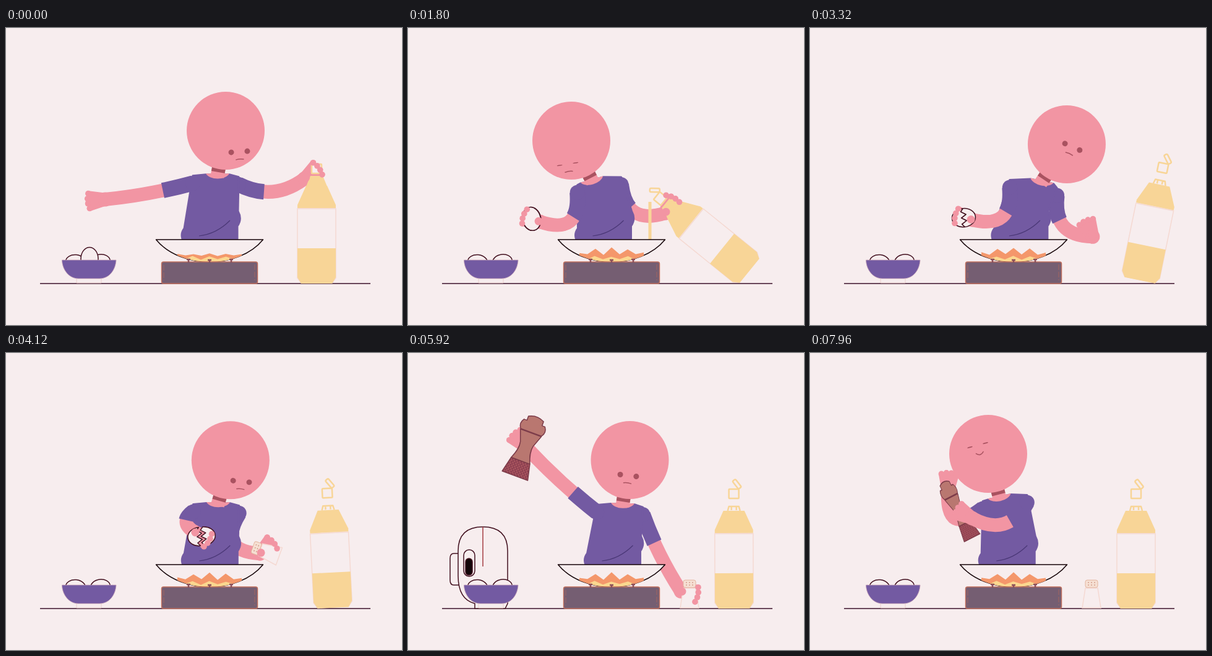
Animation, 640 px wide and 480 px high, one loop 8 s. Source, as an HTML page:

```html
<!DOCTYPE html>
<html lang="en">
<head>
<meta charset="utf-8">
<title>Cooking eggs</title>
<style>
  html, body { margin: 0; width: 100%; height: 100%; overflow: hidden; background: #f7edee; }
  svg { display: block; width: 100%; height: 100%; }
  .skin { fill: #f295a3; }
  .limb { fill: none; stroke: #f295a3; stroke-width: 22; }
  .finger { fill: none; stroke: #f295a3; stroke-width: 9; stroke-linecap: round; }
  .shirt { fill: #735aa2; }
  .sleeve { fill: none; stroke: #735aa2; stroke-width: 25; }
  .dark { fill: none; stroke: #a95260; }
  .line { fill: #f7edee; stroke: #42101f; stroke-width: 1.5; }
  .oil { fill: #f8d597; }
  .oilLine { fill: none; stroke: #f8d597; stroke-width: 2.5; stroke-linejoin: round; }
  .glass { fill: #f7edee; stroke: #f5d9d2; stroke-width: 1.5; }
  .wood { fill: #b97770; stroke: #7b3a48; stroke-width: 1.5; stroke-linejoin: round; }
</style>
</head>
<body>
<svg viewBox="0 0 640 480">
  <defs>
    <clipPath id="panClip"><path d="M243 342H416C396 367 362 378 329 378S263 367 243 342Z"/></clipPath>
    <pattern id="pepper" width="5" height="5" patternUnits="userSpaceOnUse">
      <rect width="5" height="5" fill="#a4525c"/>
      <path d="M1 1h1.6M3 3.5h1.6" stroke="#6a2440" stroke-width="1.4"/>
    </pattern>
  </defs>
  <rect width="640" height="480" fill="#f7edee"/>
  <path d="M55 413H589" stroke="#3a1028" stroke-width="1.5"/>

  <g id="pod" class="line">
    <path d="M81 324H74Q68 324 68 332V367Q68 375 74 375H82"/>
    <path d="M108 413V405Q81 398 81 360V320Q81 281 121 281T161 320V405L157 413Z"/>
    <path d="M121 281V345" stroke="#a33a3f"/>
    <rect x="90" y="318" width="18" height="43" rx="9"/>
    <rect x="93" y="332" width="11" height="27" rx="5.5" fill="#120508"/>
  </g>

  <g id="behind"><g id="armR"></g></g>
  <path id="torso" class="shirt" stroke="#735aa2" stroke-width="3" stroke-linejoin="round"/>
  <path id="crease" fill="none" stroke="#4a3776" stroke-width="1.2"/>
  <path id="collar" class="skin"/>
  <path id="neck" class="limb"/>
  <path id="shade" class="dark" stroke-width="22"/>
  <g id="head">
    <circle class="skin" r="63"/>
    <g id="face">
      <ellipse id="eyeL" cx="-13" rx="4.5" fill="#a95260"/>
      <ellipse id="eyeR" cx="13" rx="4.5" fill="#a95260"/>
      <path id="mouth" class="dark" stroke-width="1.5" stroke-linecap="round"/>
    </g>
  </g>

  <g id="armL"></g>
  <g id="egg" class="line" stroke-linejoin="round">
    <path id="shellA" d="M-15 0A15 19 0 0 1 15 0L10 4 5 -4 0 4 -5 -4 -10 4Z"/>
    <path id="shellB" d="M-15 0A15 19 0 0 0 15 0L10 4 5 -4 0 4 -5 -4 -10 4Z"/>
    <ellipse id="whole" rx="14.5" ry="19"/>
  </g>
  <g id="tipsL"></g>
  <g id="mill">
    <path class="wood" d="M-22 0H22L16 -26H-16Z" style="fill:url(#pepper)"/>
    <path class="wood" d="M-16 -26C-11 -38 -9 -46 -11 -55L-18 -74H18L11 -55C9 -46 11 -38 16 -26Z"/>
    <path class="wood" d="M-18 -75Q-24 -83 -18 -91H-13V-98Q0 -105 13 -98V-91H18Q24 -83 18 -75Z"/>
  </g>
  <g id="front"></g>

  <path id="pour" stroke="#f8d597" stroke-width="5" fill="none"/>
  <g id="bottle">
    <path class="glass" d="M-31 -120V-8L-25 0H25L31 -8V-120Z"/>
    <path class="oil" d="M-31 -56H31V-9L25 1H-25L-31 -9Z"/>
    <path class="oil" d="M-31 -121V-126L-17 -157H17L31 -126V-121Z"/>
    <path id="throat" class="oil" d="M-17 -156L-10 -173H10L17 -156Z"/>
    <path id="spout" class="oilLine" d="M-10 -157L-8 -164H8L10 -157M-4 -164V-158M4 -164V-158"/>
    <rect class="oilLine" x="-8" y="-192" width="16" height="15" rx="1" style="fill:#f7edee"/>
    <rect id="lid" class="oilLine" x="-3" y="-8" width="6" height="16" rx="2" transform="translate(5 -200) rotate(-38)"/>
  </g>
  <g id="shaker">
    <path class="glass" d="M-15 0L-10 -32H10L15 0Z"/>
    <rect x="-10" y="-45" width="20" height="12" rx="3" fill="#f6e0d4" stroke="#e3b59f"/>
    <path d="M-6 -41H7M-6 -37H7" stroke="#d59f8c" stroke-width="1.6" stroke-dasharray="2 3"/>
  </g>
  <g id="tipsR"></g>
  <g id="salt" fill="#f7edee"></g>

  <path d="M242.5 342H415.500C395 367 361 378 329 378S263 367 242.500 342Z" fill="#f7edee" stroke="#160509" stroke-width="1.5" stroke-linejoin="round"/>
  <g clip-path="url(#panClip)">
    <path id="fire" fill="#f4976b"/>
    <path id="glow" fill="#fbd78f"/>
  </g>
  <rect x="251.500" y="378" width="155" height="35" rx="3" fill="#755e72" stroke="#c0705f" stroke-width="1.5"/>
  <path d="M255 383V408M402 382V408" stroke="#a36561" stroke-dasharray="9 3"/>
  <path d="M292 374h6M295 374v5M326 375h6M329 375v4M361 374h6M364 374v5" stroke="#8d4e58" stroke-width="2.5"/>

  <ellipse class="line" cx="112.500" cy="378" rx="16" ry="11.500" transform="rotate(6 112 378)"/>
  <ellipse class="line" cx="152.500" cy="378" rx="16" ry="12" transform="rotate(-8 152 378)"/>
  <ellipse id="bowlEgg" class="line" cx="135" cy="373" rx="14" ry="18.500"/>
  <path d="M114 405V412H154V405" fill="#f7edee" stroke="#ecd0cd"/>
  <path d="M90.500 375H178C177 391 167 405 151 405H117C102 405 91 391 90.500 375Z" fill="#735aa2" stroke="#c7a2b7" stroke-width=".8"/>
</svg>
<script>
const LOOP = 8000, NS = 'http://www.w3.org/2000/svg';
const $ = id => document.getElementById(id);
const set = (e, attrs) => { for (const k in attrs) e.setAttribute(k, attrs[k]); };
const path = (id, d) => set($(id), { d });
const show = (id, on) => set($(id), { visibility: on ? 'visible' : 'hidden' });
const place = (id, x, y, r = 0, sx = 1, sy = 1) =>
  set($(id), { transform: `translate(${x} ${y}) rotate(${r}) scale(${sx} ${sy})` });
const add = (parent, tag, cls) => {
  const e = document.createElementNS(NS, tag);
  e.setAttribute('class', cls);
  return $(parent).appendChild(e);
};

const ramp = (t, a, b) => Math.min(1, Math.max(0, (t - a) / (b - a)));
const ease = (t, a, b) => { const u = ramp(t, a, b); return u * u * (3 - 2 * u); };
const hold = (t, a, b, c, d) => ease(t, a, b) - ease(t, c, d);
const mix = (p, q, u) => p.map((v, i) => v + (q[i] - v) * u);

// Key poses: a part without a value moves on to the next pose that has one.
// Face is the offset from the head plus a tilt; left and right are the wrists.
const poses = [
  { t: 0, head: [355, 166], neck: [342], face: [22, 34, -4], left: [160, 277], right: [483, 243] },
  { t: 840, until: 920, head: [261, 196], neck: [288], face: [-9, 38, -6], left: [150, 355], right: [442, 264] },
  { t: 1750, until: 2350, head: [264, 182], neck: [297], face: [-6, 38, -9], left: [213, 313], right: [416, 299] },
  { t: 2900, right: [462, 260] },
  { t: 3300, head: [415, 188], neck: [375], face: [9, 4, 24], left: [262, 310], right: [457, 337] },
  { t: 3800, right: [441, 385] },
  { t: 4300, until: 5200, head: [358, 172], neck: [340], face: [18, 37, 4], left: [308, 287], right: [398, 299] },
  { t: 5500, left: [150, 275] },
  { t: 5850, left: [190, 150], right: [441, 385] },
  { t: 6640, head: [359, 174], neck: [354], face: [-23, 13, 10], left: [200, 218], right: [441, 385] },
  { t: 7350, head: [288, 163], neck: [306], face: [-17, -14, -15], left: [223, 222], right: [262, 267] }
];
function at(part, t) {
  const keys = poses.filter(p => p[part]), i = keys.findIndex(p => p.t > t);
  if (i < 0) return keys[keys.length - 1][part];
  const a = keys[i - 1], b = keys[i];
  return mix(a[part], b[part], ease(t, a.until || a.t, b.t));
}

// The elbow sinks to the lower side, further the closer the hand is to the shoulder.
function makeArm(side) {
  const group = 'arm' + side, tips = 'tips' + side;
  const limb = add(group, 'path', 'limb'), fingers = add(group, 'path', 'finger');
  const palm = add(group, 'circle', 'skin'), sleeve = add(group, 'path', 'sleeve');
  const cap = add(group, 'circle', 'shirt');
  const dots = Array.from({ length: 4 }, () => add(tips, 'circle', 'skin'));
  const thumb = add(tips, 'circle', 'skin');
  const dot = (e, cx, cy, r) => set(e, { cx, cy, r });

  return (s, w, turn) => {
    const dx = w[0] - s[0], dy = w[1] - s[1], d = Math.hypot(dx, dy);
    const bow = Math.max(4, .55 * (148 - d)), k = bow / d * Math.max(-1, Math.min(1, dx / 6));
    const bend = u => [s[0] + dx * u - dy * k, s[1] + dy * u + dx * k];
    const p = bend(1 / 3), q = bend(2 / 3);
    set(limb, { d: `M${s}C${p} ${q} ${w}` });

    const share = 52 / (d + 1.5 * bow);
    const a = mix(s, p, share), b = mix(p, q, share), c = mix(q, w, share);
    const m = mix(a, b, share);
    set(sleeve, { d: `M${s}C${a} ${m} ${mix(m, mix(b, c, share), share)}` });
    dot(cap, ...s, 12);
    dot(palm, ...w, 11.5);

    const angle = Math.atan2(w[1] - q[1], w[0] - q[0]) + turn * Math.PI / 180;
    const cos = Math.cos(angle), sin = Math.sin(angle);
    const from = (out, over) => [w[0] + cos * out - sin * over, w[1] + sin * out + cos * over];
    let line = '';
    dots.forEach((e, i) => {
      const o = (i - 1.5) * 8, tip = from(29 - Math.abs(o) / 4, o);
      line += `M${from(0, o / 2)}L${tip}`;
      dot(e, ...tip, 4.8);
    });
    set(fingers, { d: line });
    dot(thumb, ...from(2, 0), 6.5);
    return from(14, 0);
  };
}
const drawL = makeArm('L'), drawR = makeArm('R');
const grains = Array.from({ length: 14 }, () => add('salt', 'circle', 'grain'));

function drawBody(t) {
  const [hx, hy] = at('head', t), [nx] = at('neck', t), [fx, fy, tilt] = at('face', t);
  const bliss = ease(t, 6800, 7300), shut = bliss + hold(t, 1000, 1700, 2350, 2700);
  const open = 1 - .8 * shut - .4 * ramp(fy, 34, 38);
  place('head', hx, hy);
  place('face', fx, fy, tilt);
  for (const e of ['eyeL', 'eyeR']) set($(e), { ry: Math.max(.8, 4.5 * open) });
  path('mouth', `M-6 12.5Q0 ${11 + 8 * bliss} 6 12.5`);

  // Shoulders and hem follow the sideways lean of the neck.
  const ny = hy + Math.sqrt(72 ** 2 - (nx - hx) ** 2), lean = nx - 342;
  const a = lean * .35 * Math.PI / 180, dx = 19 * Math.cos(a), dy = 19 * Math.sin(a);
  const lx = nx - 40 - .37 * lean, ly = ny + 2 - .13 * lean;
  const rx = nx + 34 - .3 * lean, ry = ny + 4 + .2 * lean;
  const bl = 285 + .3 * lean, br = bl + 89;
  path('torso', `M${nx - dx} ${ny - dy}L${lx} ${ly}L${bl + 3} 324Q${bl - 3} 332 ${bl} 341H${br}V320` +
    `Q${br + 8} 309 ${br + 1} 296L${rx} ${ry}L${nx + dx} ${ny + dy}Z`);
  path('crease', `M${br - 62} 336Q${br - 34} 333 ${br - 12} 311`);
  path('collar', `M${nx - dx} ${ny - dy - 1.5}A20 12 ${lean * .35} 0 0 ${nx + dx} ${ny + dy - 1.5}Z`);
  const h = [hx, hy], n = [nx, ny];
  path('neck', `M${h}L${mix(h, n, 76 / 72)}`);
  path('shade', `M${h}L${mix(h, n, 68 / 72)}`);
  return [[lx, ly + 12], [rx, ry + 12]];
}

function drawBottle(t) {
  // Tips in two steps, then swings back upright like a damped pendulum.
  const u = Math.max(0, t - 2400);
  const tilt = (-25 * ease(t, 0, 840) - 26 * ease(t, 900, 1750)) *
    Math.exp(-u / 620) * Math.cos(u * Math.PI / 920);
  const lift = Math.sin(Math.abs(tilt) * Math.PI / 180);
  place('bottle', 502 + 25 * ease(t, 840, 1750) + 31 * lift, 412 - 26 * lift, tilt);
  set($('lid'), { opacity: ramp(t, 500, 650) });
  show('throat', t < 2900);
  show('spout', t >= 2900);
  const top = 281 + 61 * ramp(t, 2320, 2440), end = 281 + 61 * ramp(t, 1500, 1640);
  path('pour', `M391 ${top}V${Math.max(top, end)}`);
  show('pour', t > 1500 && t < 2440);
}

function drawFire(t) {
  const grow = ramp(t, 0, 240);
  const zigzag = (n, x0, step, y) => `M${x0} 380L` + Array.from({ length: n },
    (_, i) => `${x0 + i * step} ${y(i) - Math.sin(t / 160 + i * 2.1) * .7}`).join('L') + 'V380Z';
  path('fire', zigzag(9, 277, 13, i => 368 - grow * (i % 2 ? 2 : 13 - (i - 4) ** 2 / 2) - (i % 2 ? 0 : 3 * (1 - grow))));
  path('glow', zigzag(7, 288, 13.5, i => i % 2 ? 369 : 374));
}

function draw(t) {
  const [sl, sr] = drawBody(t), left = at('left', t), right = at('right', t);
  const shake = 4 * hold(t, 4250, 4400, 5150, 5300) * Math.sin((t - 5080) / 60);
  const crossed = t > 6900;
  if (($('armR').parentNode.id === 'front') !== crossed) $(crossed ? 'front' : 'behind').append($('armR'));
  const palm = drawL(sl, left, 0);
  drawR(sr, [right[0], right[1] + shake],
    -45 * hold(t, 900, 1750, 6700, 7300) - 70 * hold(t, 2900, 3250, 3400, 3800));

  show('egg', t >= 920 && t < 5300);
  show('bowlEgg', t < 920);
  place('egg', ...palm, -12 + 96 * ease(t, 2000, 3200));
  const gap = 5 * ease(t, 3400, 4600);
  place('shellA', 0, -gap);
  place('shellB', 0, gap);
  show('whole', t >= 920 && t < 3000);

  drawBottle(t);

  const lift = hold(t, 3850, 4300, 5200, 5850);
  place('shaker', 455 - 21 * lift, 412 - 128 * lift + shake, -108 * lift, 1, ramp(t, 3600, 3780));
  show('shaker', t > 3600);
  grains.forEach((g, i) => {
    const u = (t / 420 + i * .618) % 1;
    set(g, { cx: 378 - i * 7 % 23 - u * 8, cy: 303 + u * 36, r: .9 });
  });
  show('salt', t > 4400 && t < 5300);

  // The mill hangs from the left hand and is turned over to grind.
  const over = ease(t, 6700, 7350), twist = 2 * over * Math.sin((t - 7960) / 70);
  const tilt = 66 * ease(t, 5500, 6640) - 93 * over + twist;
  set($('mill'), { transform: `translate(${left}) rotate(${tilt}) scale(${1 - .35 * over} 1) translate(0 ${50 + 36 * over})` });
  show('mill', t > 5500);

  const pod = ramp(t, 5250, 5450) - ramp(t, 6640, 6720);
  show('pod', pod > 0);
  place('pod', 0, 413 * (1 - pod), 0, 1, pod);
  drawFire(t);
}

const start = performance.now();
function tick() {
  draw((performance.now() - start) % LOOP);
  requestAnimationFrame(tick);
}
tick();
</script>
</body>
</html>
```
